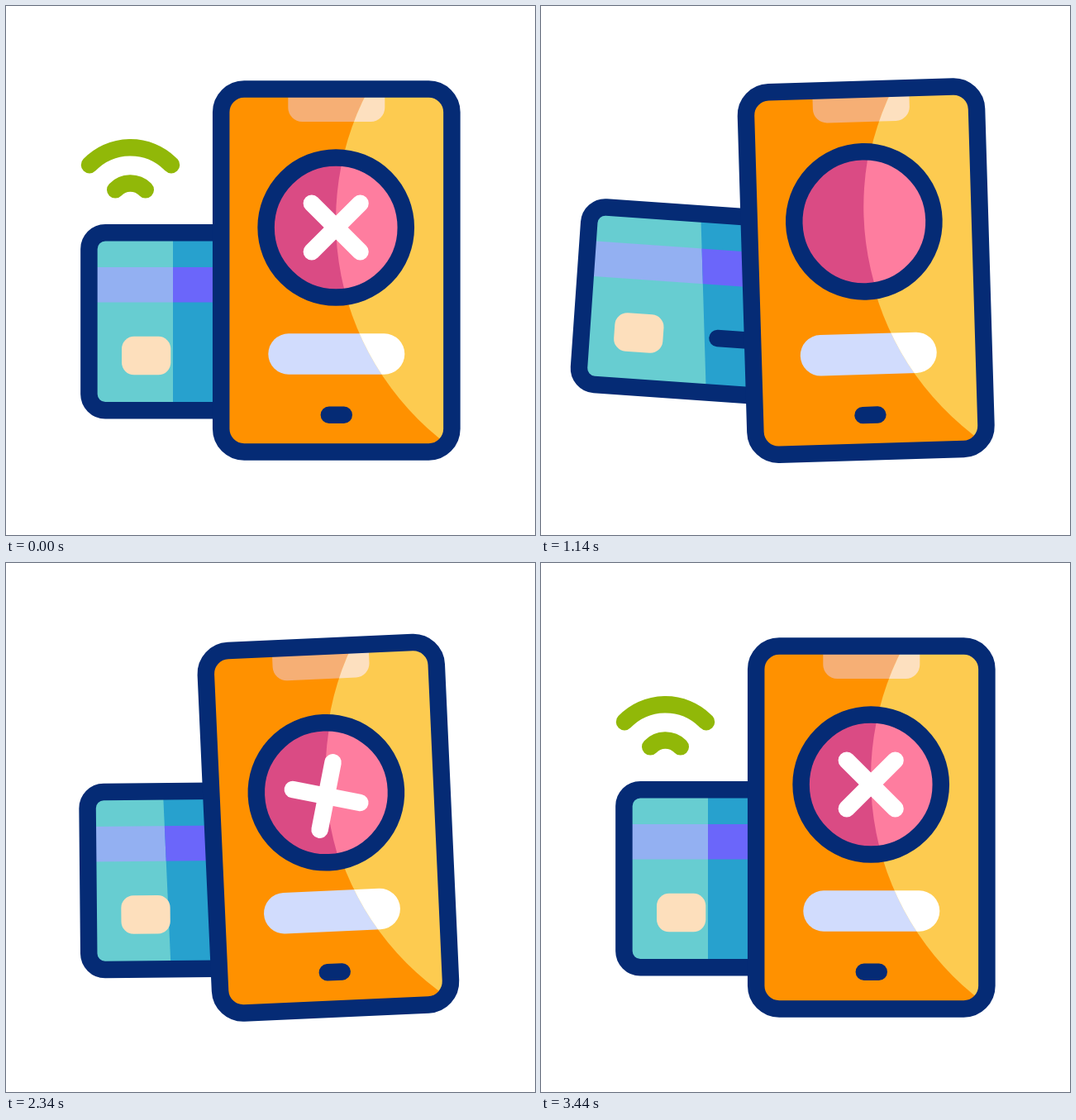
These frames come from a looping animation (640 px wide and 640 px high, 3.6 s). An HTML page with a canvas:

```html
<!DOCTYPE html>
<html lang="en">
<head>
<meta charset="utf-8">
<title>Declined card payment</title>
<style>
html, body { margin: 0; width: 100%; height: 100%; overflow: hidden; background: #fff; }
canvas { display: block; width: 640px; height: 640px; }
</style>
</head>
<body>
<canvas width="640" height="640"></canvas>
<script>
const ctx = document.querySelector('canvas').getContext('2d');
const LOOP = 3600, NAVY = '#052b75', GREEN = '#91b808', LINE = 20.5;
const rad = degrees => degrees * Math.PI / 180;

// Eased progress from 0 to 1 between two times
function ramp(t, from, to) {
  const p = Math.min(1, Math.max(0, (t - from) / (to - from)));
  return p * p * (3 - 2 * p);
}

// Rest, then alternate between +size and -size on every beat, then rest again
function swing(t, start, beat, beats, size) {
  const n = Math.floor((t - start) / beat);
  const peak = k => k <= 0 || k >= beats ? 0 : k % 2 ? size : -size;
  const from = start + n * beat;
  return peak(n) + (peak(n + 1) - peak(n)) * ramp(t, from, from + beat);
}

function pose(pivotX, pivotY, degrees, dx, dy) {
  ctx.setTransform(1, 0, 0, 1, pivotX + dx, pivotY + dy);
  ctx.rotate(rad(degrees));
  ctx.translate(-pivotX, -pivotY);
}

function box(x, y, w, h, r) {
  ctx.beginPath();
  ctx.roundRect(x, y, w, h, r);
}

function disc(x, y, r) {
  ctx.beginPath();
  ctx.arc(x, y, r, 0, 7);
}

function line(x1, y1, x2, y2, color) {
  ctx.beginPath();
  ctx.moveTo(x1, y1);
  ctx.lineTo(x2, y2);
  stroke(color);
}

function fill(color) {
  ctx.fillStyle = color;
  ctx.fill();
}

function stroke(color, width = LINE) {
  ctx.strokeStyle = color;
  ctx.lineWidth = width;
  ctx.stroke();
}

// Stage 0 is hidden in the card, 1 the small arc, 2 the large arc, 3 faded out
function drawWave(stage) {
  if (stage <= 0 || stage >= 3) return;
  const radius = stage < 1 ? 25.4 * stage : 25.4 + 43.4 * (stage - 1);
  ctx.beginPath();
  ctx.arc(150.5, 240 + 35 * Math.max(0, 1 - stage), radius, rad(-136), rad(-44));
  stroke(GREEN, LINE * Math.min(1, 3 - stage));
}

function drawSignal(t) {
  const leaving = t < 1200;
  drawWave(leaving ? 2 + ramp(t, 0, 300) : ramp(t, 2350, 2500) + ramp(t, 2500, 3100));
  drawWave(leaving ? 1 + ramp(t, 0, 300) + ramp(t, 300, 600) : ramp(t, 2500, 2800));
}

function drawCard(toCard, toPhone) {
  const outline = () => box(100.4, 274.2, 330, 215, 19.7);
  const paint = (base, stripe) => {
    toCard();
    outline();
    fill(base);
    box(100, 316, 330, 42.5, 0);
    fill(stripe);
  };
  ctx.save();
  paint('#67cdd1', '#93b0f2');
  // Shadow of the phone
  toPhone();
  box(202, 0, 400, 640, 0);
  ctx.clip();
  paint('#27a1ce', '#6b66fa');
  ctx.restore();

  toCard();
  box(140, 399.8, 59.3, 46.5, 15);
  fill('#fddfbc');
  line(265, 423, 390, 423, NAVY);
  outline();
  stroke(NAVY);
}

function drawScreen(base, notch, bar) {
  box(260.2, 100.6, 279.2, 438.8, 28);
  fill(base);
  box(341.3, 105, 117, 35, [0, 0, 17, 17]);
  fill(notch);
  box(317.3, 396.3, 165, 49.4, 24.7);
  fill(bar);
}

function drawBadge(t) {
  const rise = ramp(t, 500, 1750), drop = ramp(t, 1750, 2120), settle = ramp(t, 2120, 2700);
  const away = t < 1000;
  const crossY = away ? -128 * ramp(t, 200, 500)
    : -128 + 138 * ramp(t, 1500, 1900) - 10 * ramp(t, 1900, 2700);

  ctx.translate(0, 14 * (2 * drop - rise - settle));
  disc(399.2, 268, 84.6);
  fill('#da4b84');
  ctx.save();
  ctx.clip();
  disc(738, 260, 339);
  fill('#fe7d9f');
  ctx.translate(399.2, 268 + crossY);
  ctx.rotate(rad(away ? -45 : 17 - 62 * ramp(t, 2200, 3200)));
  line(0, -41.5, 0, 41.5, '#fff');
  line(-41.5, 0, 41.5, 0, '#fff');
  ctx.restore();
  disc(399.2, 268, 84.6);
  stroke(NAVY);
}

function drawPhone(t) {
  drawScreen('#ff9100', '#f6af75', '#d1dcfd');
  ctx.save();
  disc(738, 260, 339);
  ctx.clip();
  drawScreen('#fdcb50', '#fde0bf', '#fff');
  ctx.restore();
  box(260.2, 100.6, 279.2, 438.8, 28);
  stroke(NAVY);

  const lit = t >= 1500 && t < 2300, grow = lit ? 1.4 : 0;
  box(380.6 - grow, 484.6 - grow, 38.4 + 2 * grow, 20.4 + 2 * grow, 11.5);
  fill(lit ? GREEN : NAVY);
  drawBadge(t);
}

function draw(now) {
  const t = now % LOOP;
  const out = ramp(t, 455, 945) - ramp(t, 945, 1450);
  const cardAngle = 6 * out + swing(t, 1600, 300, 4, 6);
  const phoneAngle = swing(t, 1000, 400, 6, -6);
  const toCard = () => pose(420, 489, cardAngle, -85 * out, -15.5 * out);
  const toPhone = () => pose(400, 540, phoneAngle, 0, swing(t, 300, 300, 2, 19));

  ctx.resetTransform();
  ctx.fillStyle = '#fff';
  ctx.fillRect(0, 0, 640, 640);
  ctx.lineCap = 'round';
  drawSignal(t);
  drawCard(toCard, toPhone);
  toPhone();
  drawPhone(t);
  requestAnimationFrame(draw);
}

draw(0);
</script>
</body>
</html>
```
